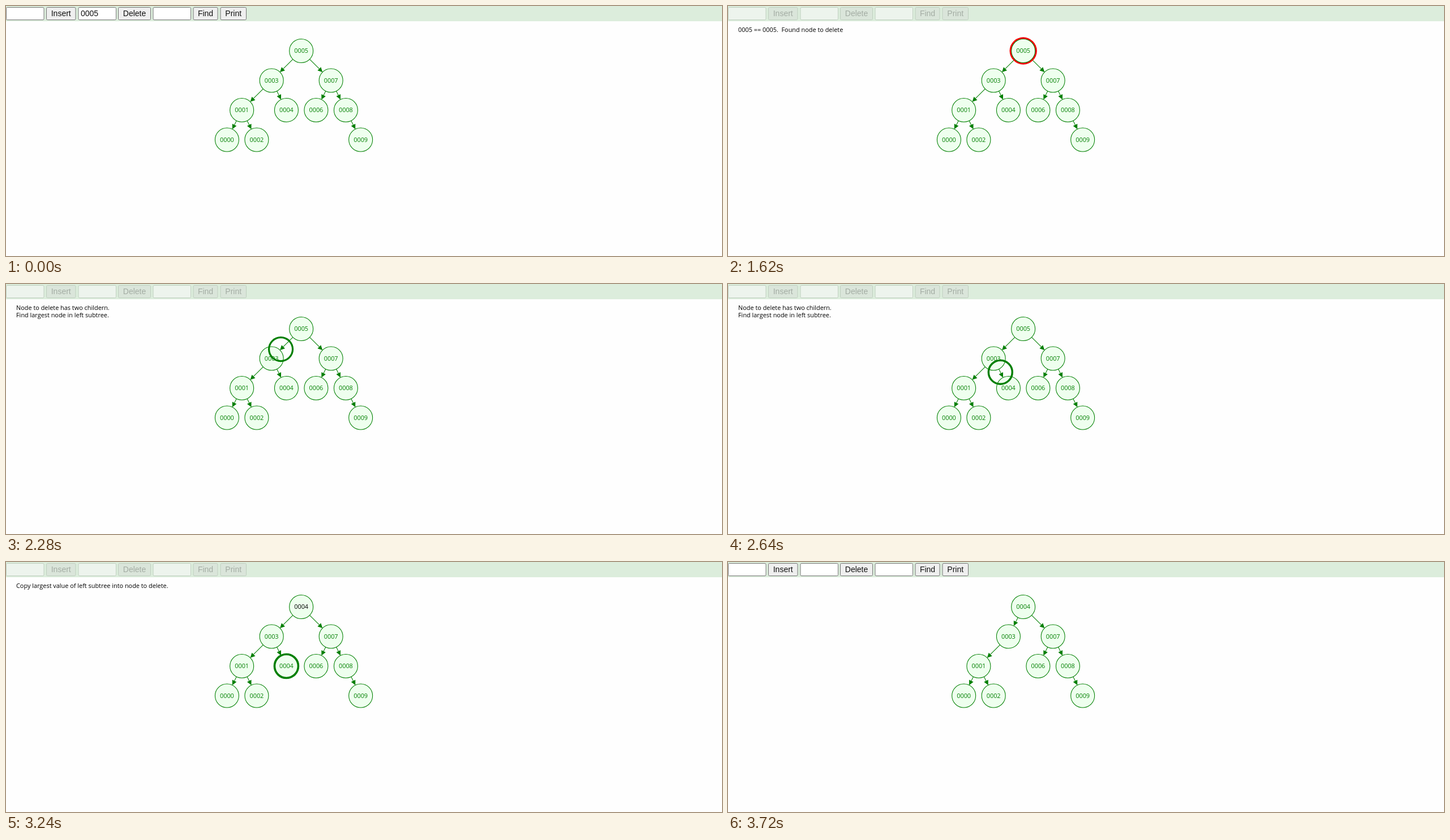
These frames come from a looping animation (1265x443 px, 4.68 s). An HTML page:

```html
<!DOCTYPE html>
<html lang="en">
<head>
<meta charset="utf-8">
<title>Binary search tree: delete</title>
<style>
  html, body { margin: 0; width: 100%; height: 100%; overflow: hidden; background: #fefefe; }
  svg { display: block; }
  text { white-space: pre; }
  .ui { font: 14px "Liberation Sans", Arial, sans-serif; }
  .note { font: 10.9px "Open Sans", "Noto Sans", sans-serif; }
  .mid { text-anchor: middle; }
</style>
</head>
<body>
<svg id="stage" width="1265" height="443"></svg>
<script>
const LOOP = 4680, R = 21, GREEN = '#007f00';

// Moments at which each stage of the deletion begins
const T = { ring: 180, blur: 240, hover: 960, press: 1140, start: 1260, found: 1620,
            left: 2054, right: 2470, copy: 2860, remove: 3290, done: 3700 };

// Key: [column, row, parent, columns moved by the final layout]
const TREE = {
  5: [5, 0, null, 0], 3: [3, 1, 5, 1], 7: [7, 1, 5, 0], 1: [1, 2, 3, 1], 4: [4, 2, 3, 0],
  6: [6, 2, 7, 0], 8: [8, 2, 7, 0], 0: [0, 3, 1, 1], 2: [2, 3, 1, 1], 9: [9, 3, 8, 0]
};

// [x, width, caption]; a control without a caption is a text field
const CONTROLS = [[0.5, 66.5], [71.5, 51.5, 'Insert'], [128, 66.5], [198.5, 57, 'Delete'],
                  [260, 66.5], [331, 43, 'Find'], [379, 45.5, 'Print']];

const MESSAGES = [
  [T.done, ''],
  [T.remove, 'Remove node whose value we copied.'],
  [T.copy, 'Copy largest value of left subtree into node to delete.'],
  [T.left, 'Node to delete has two childern.\nFind largest node in left subtree.'],
  [T.found, '0005 == 0005.  Found node to delete'],
  [T.start, 'Deleting 0005'],
  [0, '']
];

const stage = document.getElementById('stage');
const at = (col, row) => [390.4 + 26.25 * col, 79.5 + 52.5 * row];
const progress = (t, start, length) => Math.min(1, Math.max(0, (t - start) / length));
const mix = (a, b, k) => a.map((v, i) => v + (b[i] - v) * k);
const place = key => at(TREE[key][0], TREE[key][1]);
const during = (t, a, b) => t >= a && t < b;

const text = (x, y, s, cls, fill) => `<text x="${x}" y="${y}" class="${cls}" fill="${fill}">${s}</text>`;
const circle = ([x, y], r, fill, stroke, width) =>
  `<circle cx="${x}" cy="${y}" r="${r}" fill="${fill}" stroke="${stroke}" stroke-width="${width}"/>`;
const box = (x, y, w, h, fill, stroke, width = 1) =>
  `<rect x="${x}" y="${y}" width="${w}" height="${h}" rx="2" fill="${fill}" stroke="${stroke}" stroke-width="${width}"/>`;
const label = ([x, y], s, fill) => text(x, y + 3.6, s, 'note mid', fill);

function toolbar(t) {
  const off = during(t, T.start, T.done);
  let out = '<rect width="1265" height="27" fill="#dceddc"/>';
  for (const [x, w, caption] of CONTROLS) {
    let fill = caption ? '#efefef' : '#ffffff', stroke = '#767676';
    if (off) {
      fill = caption ? '#dae5da' : '#edf4ed';
      stroke = '#bfcfbf';
    } else if (caption === 'Delete') {
      if (during(t, T.hover, T.press)) [fill, stroke] = ['#e3e1e5', '#4f4f4f'];
      if (during(t, T.press, T.start)) [fill, stroke] = ['#f5f5f5', '#8d8d8d'];
    }
    out += box(x, 2.5, w, 22, fill, stroke);
    if (caption) out += text(x + w / 2, 18, caption, 'ui mid', off ? '#a3aca3' : '#101010');
  }
  if (t < T.start) out += text(132, 18, '0005', 'ui', '#101010');
  if (during(t, T.ring, T.blur)) out += box(128, 2, 66.5, 22.5, 'none', '#101010', 2);
  return out;
}

function edge(a, b) {
  const dx = b[0] - a[0], dy = b[1] - a[1], d = Math.hypot(dx, dy);
  const ux = dx / d, uy = dy / d;
  const x = b[0] - ux * R, y = b[1] - uy * R;
  const bx = x - ux * 8.4, by = y - uy * 8.4, px = uy * 4.2, py = ux * 4.2;
  return `<path d="M${a[0] + ux * R} ${a[1] + uy * R}L${bx} ${by}" stroke="${GREEN}" stroke-width="1.05"/>` +
    `<path d="M${x} ${y}L${bx + px} ${by - py}L${bx - px} ${by + py}Z" fill="${GREEN}"/>`;
}

function tree(t) {
  const shift = progress(t, T.remove, 370);
  const pulse = 3.15 + 2.1 * (1 - Math.abs((((t - T.found) / 332 % 1 + 1) % 1) * 2 - 1));
  const keys = Object.keys(TREE).filter(k => k !== '4' || t < T.remove);
  const spot = k => at(TREE[k][0] + TREE[k][3] * shift, TREE[k][1]);
  let edges = '', nodes = '';
  for (const k of keys) {
    const p = spot(k), parent = TREE[k][2];
    if (parent !== null) edges += edge(spot(parent), p);
    if (k === '5' && during(t, T.found, T.left)) nodes += circle(p, R + pulse, '#ff0000', 'none', 0);
    nodes += circle(p, R, '#eeffee', GREEN, 1.05);
    const copied = k === '5' && t >= T.copy;
    if (!copied || t >= T.remove) nodes += label(p, '000' + (copied ? 4 : k), GREEN);
  }
  let out = edges + nodes;
  if (during(t, T.left, T.remove)) {
    const p = t < T.right ? mix(place(5), place(3), progress(t, T.left, 330))
                          : mix(place(3), place(4), progress(t, T.right, 370));
    out += circle(p, R, 'none', GREEN, pulse);
  }
  if (during(t, T.copy, T.remove))
    out += label(mix(place(4), place(5), progress(t, T.copy, 370)), '0004', '#000000');
  return out;
}

function message(t) {
  return MESSAGES.find(m => t >= m[0])[1].split('\n')
    .map((line, i) => text(18, 46.3 + 12.6 * i, line, 'note', '#000000')).join('');
}

function draw() {
  const t = performance.now() % LOOP;
  stage.innerHTML = toolbar(t) + tree(t) + message(t);
  requestAnimationFrame(draw);
}
draw();
</script>
</body>
</html>
```
